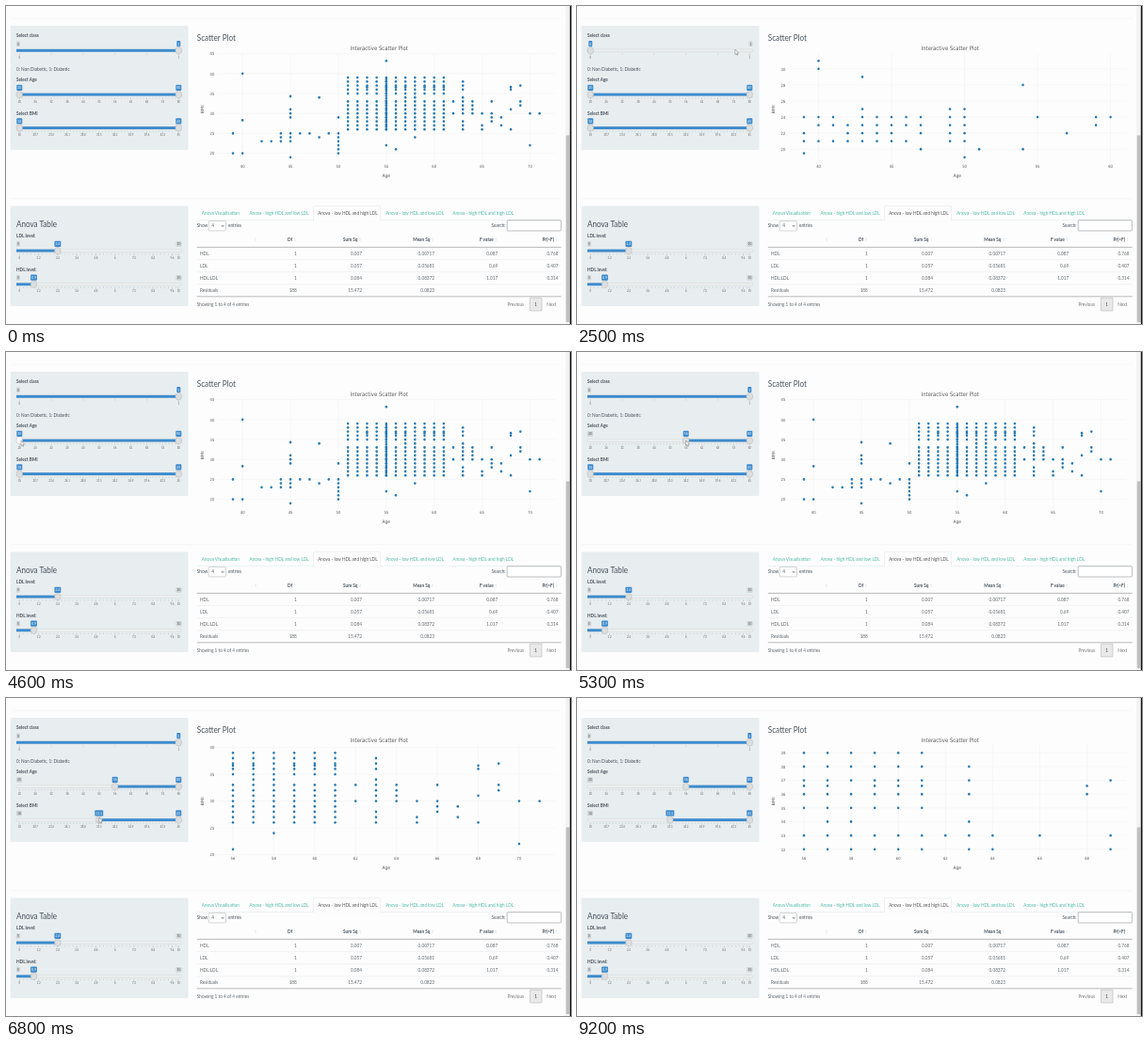
An HTML page that plays this animation: 600x338 px, repeating every 9.3 s.

```html
<!DOCTYPE html>
<html lang="en">
<head>
<meta charset="utf-8">
<title>Scatter plot and Anova table</title>
<style>
html, body { margin: 0; width: 100%; height: 100%; overflow: hidden; background: #fdfdfd; }
svg { display: block; width: 100vw; height: 100vh; }
text { font-family: Lato, sans-serif; fill: #48525c; white-space: pre; }
.plot text { font-family: "DejaVu Sans", sans-serif; fill: #5a5a5a; }
</style>
</head>
<body>
<svg id="stage" viewBox="0 0 600 338" preserveAspectRatio="none"></svg>
<script>
const LOOP = 9300;
const BLUE = '#3d8bcd', DOT = '#2579b5', TEAL = '#4dbaa4', CELL = '#5f666c';
const svg = document.getElementById('stage');

function el(parent, name, attrs = {}) {
  const node = document.createElementNS('http://www.w3.org/2000/svg', name);
  for (const key in attrs) node.setAttribute(key, attrs[key]);
  parent.appendChild(node);
  return node;
}
const group = (parent, attrs) => el(parent, 'g', attrs);
const show = (node, on) => node.setAttribute('display', on ? 'inline' : 'none');

function rect(parent, x, y, width, height, fill, more = {}) {
  return el(parent, 'rect', { x, y, width, height, fill, ...more });
}
function line(parent, x1, y1, x2, y2, stroke, width = 0.35) {
  return el(parent, 'line', { x1, y1, x2, y2, stroke, 'stroke-width': width });
}
function text(parent, x, y, str, { size = 15, anchor = 'start', fill, weight = 400, turn = 0 } = {}) {
  const node = el(parent, 'text', {
    transform: `translate(${x} ${y}) scale(.3125 .36) rotate(${turn})`,
    'font-size': size, 'text-anchor': anchor, 'font-weight': weight
  });
  if (fill) node.style.fill = fill;
  node.textContent = str;
  return node;
}

// ---------- page ----------
function page() {
  for (const y of [13.2, 204.7]) line(svg, 4.7, y, 589.7, y, '#ecf0f1', 0.5);
  rect(svg, 4.7, 21, 188.8, 132, '#e8edef', { rx: 1.3 });
  rect(svg, 4.7, 212.4, 188.8, 106.6, '#e8edef', { rx: 1.3 });
  rect(svg, 594.2, 0, 4.6, 338, '#f3f3f3');
  rect(svg, 594.7, 137.5, 3.7, 198.5, '#bfbfbf');
  rect(svg, 598.8, 0, 1.2, 338, '#111');

  const bold = { weight: 700 };
  text(svg, 11, 33, 'Select class', bold);
  text(svg, 11, 69.2, '0: Non Diabetic, 1: Diabetic');
  text(svg, 11, 80.3, 'Select Age', bold);
  text(svg, 11, 115.7, 'Select BMI', bold);
  text(svg, 11, 235.2, 'Anova Table', { size: 26 });
  text(svg, 11, 246, 'LDL level:', bold);
  text(svg, 11, 281.8, 'HDL level:', bold);
  text(svg, 202.8, 36.8, 'Scatter Plot', { size: 26 });
}

function table() {
  line(svg, 202.8, 227.6, 589.7, 227.6, '#dfe5e7', 0.5);
  el(svg, 'path', {
    d: 'M326.5 227.9V213.4q0-1 1-1H396.5q1 0 1 1V227.9',
    fill: '#fdfdfd', stroke: '#dfe5e7', 'stroke-width': 0.5
  });
  [[207.8, 'Visualisation'], [258.4, '- high HDL and low LDL'], [331.2, '- low HDL and high LDL'],
   [403.2, '- low HDL and low LDL'], [474.3, '- high HDL and high LDL']].forEach(([x, name], i) =>
    text(svg, x, 222, 'Anova ' + name, { fill: i === 2 ? '#555' : TEAL }));

  text(svg, 202.8, 235.3, 'Show');
  rect(svg, 215.2, 228.5, 18.3, 10.4, '#fff', { stroke: '#999', 'stroke-width': 0.4, rx: 0.9 });
  text(svg, 218.2, 235.3, '4');
  el(svg, 'path', { d: 'M228.8 233l1.3 1.5 1.3-1.5', fill: 'none', stroke: '#222', 'stroke-width': 0.6 });
  text(svg, 236, 235.3, 'entries');
  text(svg, 530.5, 235.3, 'Search:', { anchor: 'end' });
  rect(svg, 532.2, 227.7, 57.2, 11.3, '#fff', { stroke: '#777d83', 'stroke-width': 0.5, rx: 0.9 });

  const right = [308.8, 378, 455, 522.2, 586.5];
  ['Df', 'Sum Sq', 'Mean Sq', 'F value', 'Pr(>F)'].forEach((name, i) =>
    text(svg, right[i] - 4.5, 250.2, name, { anchor: 'end', weight: 700 }));
  [265, ...right.map(x => x - 2)].forEach(x =>
    el(svg, 'path', { d: `M${x - .8} 247.7l.8-1.1.8 1.1zM${x - .8} 248.8l.8 1.1.8-1.1z`, fill: '#d5d8dc' }));
  line(svg, 202.8, 256.4, 589.7, 256.4, '#555', 0.4);
  ['HDL 1 0.007 0.00717 0.087 0.768', 'LDL 1 0.057 0.05681 0.69 0.407',
   'HDL:LDL 1 0.084 0.08372 1.017 0.314', 'Residuals 188 15.472 0.0823'].forEach((row, r) => {
    const y = 264.7 + 13.1 * r;
    row.split(' ').forEach((cell, c) => c
      ? text(svg, right[c - 1], y, cell, { anchor: 'end', fill: CELL })
      : text(svg, 206, y, cell, { fill: CELL }));
    if (r) line(svg, 202.8, y - 8.2, 589.7, y - 8.2, '#ddd');
  });
  line(svg, 202.8, 308.8, 589.7, 308.8, '#555', 0.4);

  text(svg, 202.8, 318.8, 'Showing 1 to 4 of 4 entries', { fill: CELL });
  text(svg, 532.5, 319, 'Previous', { fill: '#777' });
  rect(svg, 556.4, 310.2, 12.6, 13.8, '#e9e9e9', { stroke: '#999', 'stroke-width': 0.4, rx: 0.6 });
  text(svg, 562.7, 319, '1', { anchor: 'middle', fill: '#444' });
  text(svg, 574.2, 319, 'Next', { fill: '#777' });
}

// ---------- sliders ----------
const LEFT = 14.3, SPAN = 169, RIGHT = LEFT + SPAN;

function tag(parent, x, y, value, blue) {
  const str = String(value);
  const w = 1.9 + 2.05 * str.length - (str.includes('.') ? 1.2 : 0);
  const left = Math.max(11, Math.min(x - w / 2, 186.5 - w));
  rect(parent, left, y - (blue ? 10.3 : 9.8), w, blue ? 6.2 : 5.4, blue ? BLUE : '#cfd4d6', { rx: 0.9 });
  text(parent, left + w / 2, y - 5.7, str,
    { size: blue ? 11 : 10, anchor: 'middle', fill: blue ? '#fff' : '#555' });
}

function slider(y, min, max, step, single) {
  const pos = v => LEFT + SPAN * (v - min) / (max - min);
  rect(svg, 11, y - 1.45, 175.5, 2.9, '#eceeef', { rx: 1, stroke: '#c9cdcf', 'stroke-width': 0.35 });
  const mark = v => {
    line(svg, pos(v), y + 3, pos(v), y + 5.4, '#999', 0.35);
    text(svg, pos(v), y + 8.5, String(+v.toFixed(1)), { size: 9, anchor: 'middle', fill: '#666' });
  };
  const count = Math.floor((max - min) / step + 1e-6);
  for (let i = 0; i <= count; i++) {
    mark(min + i * step);
    for (let j = 1; j < 5; j++) {
      const x = pos(min + (i + j / 5) * step);
      if (x < RIGHT) line(svg, x, y + 3, x, y + 4.2, '#999', 0.35);
    }
  }
  if (min + count * step < max - 0.01) mark(max);

  const live = group(svg);
  let last = '';
  return (from, to, hot) => {
    const key = [from, to, hot].join();
    if (key === last) return;
    last = key;
    live.replaceChildren();
    const a = single ? 11 : pos(from), b = pos(to);
    const knobs = single ? [to] : [from, to];
    rect(live, a, y - 1.45, b - a, 2.9, BLUE);
    if (knobs.every(v => pos(v) > 22)) tag(live, 11, y, min, false);
    if (knobs.every(v => pos(v) < 176)) tag(live, 186.5, y, max, false);
    knobs.forEach((v, i) => {
      tag(live, pos(v), y, v, true);
      el(live, 'ellipse', {
        cx: pos(v), cy: y, rx: 3.3, ry: 3.8, stroke: '#ababab', 'stroke-width': 0.4,
        fill: hot && i === 0 ? '#fff' : '#dcdedf'
      });
    });
  };
}

// ---------- data ----------
let seed = 11;
const random = () => (seed = seed * 16807 % 2147483647) / 2147483647;

// Random share of a grid of whole ages and stepped BMI values.
function cloud(ages, [lo, hi], chance = 1, step = 1) {
  const out = [];
  for (let age = ages[0]; age <= ages[1]; age++)
    for (let bmi = lo; bmi <= hi; bmi += step)
      if (random() < chance) out.push([age, bmi]);
  return out;
}

const diabetic = [
  ...cloud([51, 61], [26, 33]),
  ...cloud([51, 61], [35, 39]),
  ...cloud([53, 61], [36.6, 36.6], 0.7),
  ...cloud([57, 60], [34, 34], 0.5),
  ...cloud([55, 55], [26, 39], 1, 0.6),
  ...cloud([63, 63], [26, 38], 0.9),
  ...cloud([64, 64], [30, 33]),
  ...cloud([65, 68], [26, 31], 0.55),
  ...cloud([42, 49], [23, 25], 0.55),
  ...cloud([45, 45], [29, 31]),
  ...cloud([50, 50], [20, 25]),
  ...cloud([69, 69], [32, 33]),
  // outliers
  [39, 25], [39, 20], [40, 40], [40, 28.3], [40, 20], [45, 34.3], [45, 19], [48, 34], [50, 29],
  [55, 43.2], [55, 22], [56, 21], [58, 24], [62, 33], [62, 30], [66, 33], [68, 36], [68, 36.6],
  [69, 37], [70, 30], [70, 22], [71, 30]
];
const healthy = [
  ...cloud([39, 46], [21, 21]),
  ...cloud([39, 47], [22, 24], 0.7),
  ...cloud([49, 50], [21, 25]),
  // outliers
  [39, 19.5], [40, 30], [40, 31], [43, 25], [43, 29], [47, 20], [50, 19], [51, 20], [54, 20],
  [54, 28], [55, 24], [57, 22], [59, 23], [59, 24], [60, 24]
];
const from = (age, bmi) => diabetic.filter(p => p[0] >= age && p[1] >= bmi);

// ---------- plot ----------
const AREA = { left: 224.5, right: 583.5, top: 50.2, bottom: 167 };

function plot(data, xStep, yStep) {
  const g = group(svg, { class: 'plot' });
  const fit = (values, a, b) => {
    const lo = Math.min(...values), hi = Math.max(...values);
    return v => a + (b - a) * (v - lo) / (hi - lo);
  };
  const px = fit(data.map(p => p[0]), 241, 566.6);
  const py = fit(data.map(p => p[1]), 160.8, 58.3);
  for (let v = 0; v < 100; v += xStep) {
    const x = px(v);
    if (x < AREA.left || x > AREA.right) continue;
    line(g, x, AREA.top, x, AREA.bottom, '#ececec', 0.4);
    text(g, x, 172.4, v, { size: 12, anchor: 'middle' });
  }
  for (let v = 0; v < 100; v += yStep) {
    const y = py(v);
    if (y < AREA.top || y > AREA.bottom) continue;
    line(g, AREA.left, y, AREA.right, y, '#ececec', 0.4);
    text(g, 221.3, y + 1.8, v, { size: 12, anchor: 'end' });
  }
  const dots = data.map(([x, y]) => ({ x, y, cx: px(x), cy: py(y) }));
  dots.forEach(({ cx, cy }) => el(g, 'ellipse', { cx, cy, rx: 1.25, ry: 1.4, fill: DOT }));
  return { g, dots };
}

function plotTitles() {
  const g = group(svg, { class: 'plot' });
  text(g, 396.2, 46.8, 'Interactive Scatter Plot', { size: 17, anchor: 'middle' });
  text(g, 403.7, 181.6, 'Age', { size: 14, anchor: 'middle' });
  text(g, 209.7, 110, 'BMI', { size: 14, anchor: 'middle', turn: -90 });
}

function modebar() {
  const g = group(svg);
  const box = 'M-1.8-2H1.8V2H-1.8z', plus = 'M-2 0H2M0-2.3V2.3', dash = 'M-1 0H1', bar = 'M-2.2-1H2.2V1H-2.2z';
  const lens = 'M-1.9-.6a1.5 1.7 0 1 0 3 0a1.5 1.7 0 1 0-3 0M.7.8L2.2 2.5';
  const row = (x, gap, shapes) => shapes.forEach((d, i) => el(g, 'path', {
    d, transform: `translate(${x + i * gap} 46.3)`, fill: 'none',
    stroke: d === lens || x > 560 ? '#8f8f8f' : '#cfcfcf', 'stroke-width': 0.8
  }));
  row(493, 0, [bar]);
  row(502.5, 7.8, [lens, plus, box, box]);
  row(535.5, 7.1, [box + plus, box + dash, box, box]);
  row(567.5, 7.8, [bar, bar]);
  rect(g, 582.7, 43.6, 4.8, 5.4, '#9aa6b8');
  return g;
}

page();
table();
const setClass = slider(47.3, 0, 1, 1, true);
const setAge = slider(94.1, 20, 80, 6);
const setBmi = slider(129.6, 18, 45, 2.7);
slider(260.1, 0, 10, 1.2, true)(0, 2.4, false);
slider(295.8, 0, 10, 1.2, true)(0, 0.9, false);

const views = [
  plot(diabetic, 5, 5),
  plot(healthy, 5, 2),
  plot(from(56, 0), 2, 5),
  plot(from(56, 31.5), 2, 1)
];
plotTitles();
const bar = modebar();
const tip = group(svg, { class: 'plot' });
el(tip, 'path', { d: 'M0 0L2.8-1.6V-3.6H19.6V3.6H2.8V1.6z', fill: DOT, stroke: '#fff', 'stroke-width': 0.3 });
const tipText = text(tip, 11.2, 1.6, '', { size: 12, anchor: 'middle', fill: '#fff' });
const arrow = el(svg, 'path', {
  d: 'M0 0V5.6L1.2 4.5 2 6.4 2.8 6 2 4.2H3.6z', fill: '#fff', stroke: '#555', 'stroke-width': 0.4
});
const cross = el(svg, 'path', { d: 'M-4 0H4M0-4.6V4.6', stroke: '#222', 'stroke-width': 0.7, fill: 'none' });

// ---------- motion ----------
const AGE_STOP = LEFT + SPAN * 0.6, BMI_STOP = LEFT + SPAN / 2;
// Pointer stops: time, x, y.
const stops = [
  [300, 330, 331], [1000, RIGHT, 49], [1100, RIGHT, 49], [1700, LEFT, 49],
  [2200, LEFT, 46], [2530, RIGHT, 46], [3400, RIGHT, 46],
  [4300, LEFT, 94], [4600, 16, 94], [5000, AGE_STOP, 94], [5400, AGE_STOP, 94],
  [5900, LEFT, 127], [6500, BMI_STOP, 127], [6900, BMI_STOP, 127],
  [7300, 243, 116], [7500, 268, 111.5], [8800, 416, 120]
];
function pointer(t) {
  const i = stops.findIndex(p => p[0] >= t);
  if (i < 0 || t < stops[0][0]) return null;
  const [t0, x0, y0] = stops[Math.max(i - 1, 0)], [t1, x1, y1] = stops[i];
  const k = t1 > t0 ? (t - t0) / (t1 - t0) : 0;
  return [x0 + (x1 - x0) * k, y0 + (y1 - y0) * k];
}
function nearest(dots, at) {
  let best = null, limit = 7;
  for (const d of dots) {
    const gap = Math.hypot(d.cx - at[0], d.cy - at[1]);
    if (gap < limit) { limit = gap; best = d; }
  }
  return best;
}
const viewAt = t => t < 2000 ? 0 : t < 3600 ? 1 : t < 5500 ? 0 : t < 6900 ? 2 : 3;

function draw(time) {
  const t = Math.floor(time % LOOP / 100) * 100;
  setClass(0, t >= 1700 && t < 3200 ? 0 : 1, t >= 1000 && t < 1700);
  setAge(t < 5000 ? 20 : 56, 80, t >= 4300 && t < 5000);
  setBmi(t < 6600 ? 18 : 31.5, 45, false);
  const now = viewAt(t);
  views.forEach((v, i) => show(v.g, i === now));

  const at = pointer(t);
  const inPlot = !!at && t > 7000 && at[0] > AREA.left;
  show(arrow, at && !inPlot);
  show(cross, inPlot);
  show(bar, inPlot);
  if (at) (inPlot ? cross : arrow).setAttribute('transform', `translate(${at[0]} ${at[1]})`);

  // The hover label trails the pointer.
  const hit = inPlot && nearest(views[now].dots, pointer(t - 200));
  show(tip, hit);
  if (hit) {
    tip.setAttribute('transform', `translate(${hit.cx} ${hit.cy})`);
    tipText.textContent = `(${hit.x}, ${hit.y})`;
  }
}

const start = performance.now();
function tick() {
  draw(performance.now() - start);
  requestAnimationFrame(tick);
}
tick();
</script>
</body>
</html>
```
